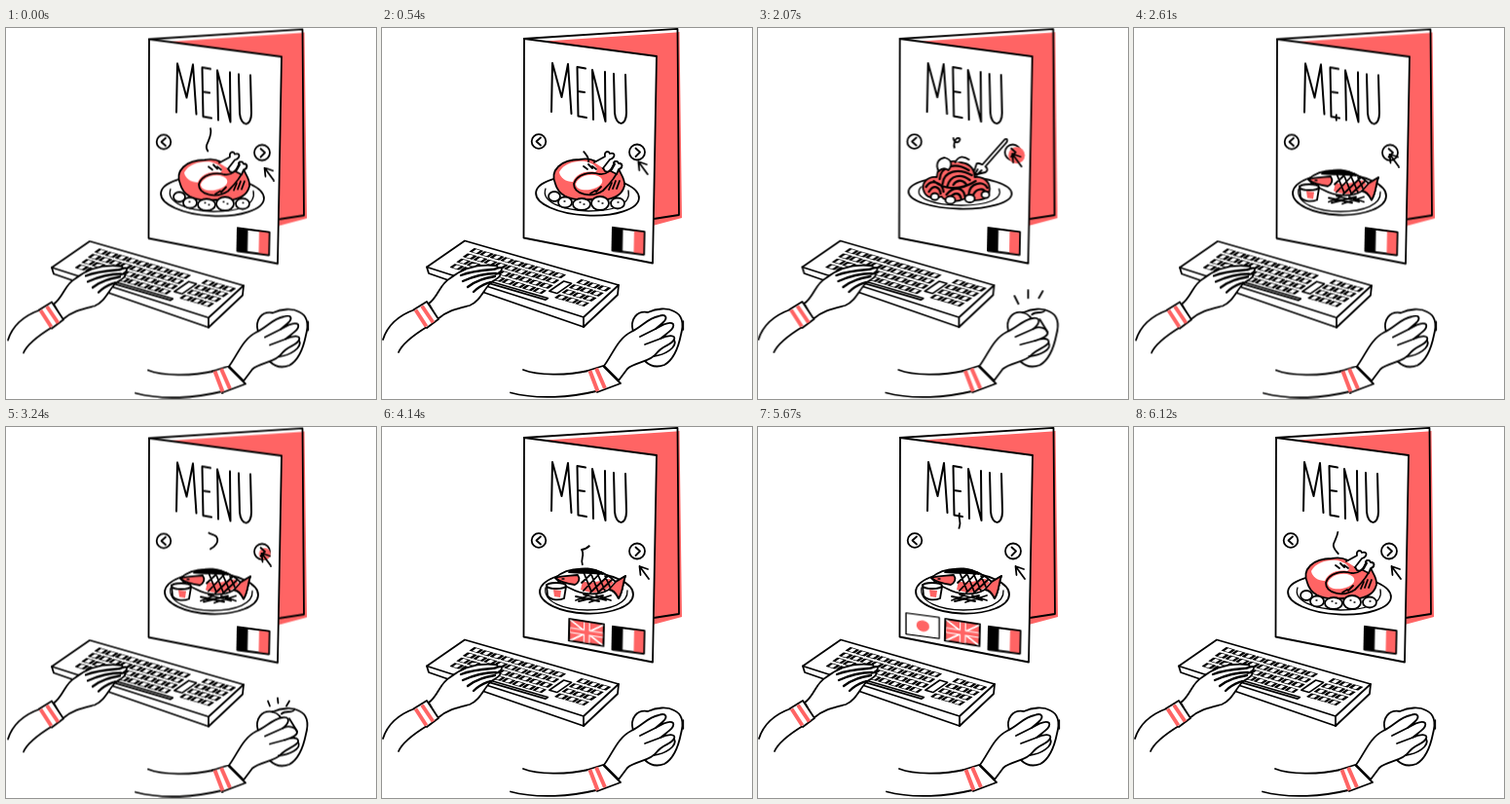
Animation of 380 by 381 pixels, one loop 6210 ms. Source, as an HTML page without scripts:

```html
<!DOCTYPE html>
<html lang="en">
<head>
<meta charset="utf-8">
<title>Menu on screen</title>
<style>
html, body { margin: 0; width: 100%; height: 100%; overflow: hidden; background: #fff; }
svg { display: block; width: 100%; height: 100%; }
.ink { fill: none; stroke: #000; stroke-width: 1.8; stroke-linecap: round; stroke-linejoin: round; }
.w { fill: #fff; }
.r { fill: #ff6464; }
.k { fill: #000; }
.n { stroke: none; }
.band { stroke: #ff6464; stroke-width: 4; stroke-linecap: butt; }
.pale { stroke: #fff; }
.thin { stroke-width: 1.3; }
.keys path { vector-effect: non-scaling-stroke; stroke-width: 1.6; }
.steam { stroke-dasharray: 26 66; stroke-linecap: butt; }

.wob { animation: wob calc(6.21s / 29) step-end infinite; }
.ray, .press, .idle, .uk, .jp, .hot { animation: 6.21s step-end infinite; }
.ray, .press, .idle, .uk, .jp { opacity: 0; }
.ray { animation-name: ray; }
.mid { animation-delay: 90ms; }
.far { animation-delay: 180ms; }
.press { animation-name: press; }
.idle { animation-name: idle; opacity: 1; }
.uk { animation-name: uk; }
.jp { animation-name: jp; }
.hot { animation-name: hot; transform-origin: 262px 128px; }
.cursor { animation: cursor 6.21s ease-in-out infinite; }
.rail { animation: rail 6.21s infinite; }

/* line boil: three redraws in turn */
@keyframes wob {
  0% { transform: translate(1px, .5px); }
  31% { transform: none; }
  66% { transform: translate(-.3px, 0) rotate(.05deg); }
}
@keyframes ray {
  0%, 15.8%, 33.2%, 53.5% { opacity: 0; }
  14.4%, 31.8%, 52.1% { opacity: 1; }
}
@keyframes press {
  0%, 18.7%, 36.1%, 56.4% { opacity: 0; }
  14.4%, 31.8%, 52.1% { opacity: 1; }
}
@keyframes idle {
  0%, 18.7%, 36.1%, 56.4% { opacity: 1; }
  14.4%, 31.8%, 52.1% { opacity: 0; }
}
/* the button flashes with each click */
@keyframes hot {
  0%, 18.7%, 36.1%, 56.4% { transform: scale(0); }
  14.4%, 17.3%, 31.8%, 34.7%, 52.1%, 55% { transform: scale(.7); }
  15.8%, 33.2%, 53.5% { transform: none; }
}
@keyframes cursor {
  0%, 6% { transform: none; }
  12%, 57.5% { transform: translate(-3px, -14px); }
  62.5%, 100% { transform: none; }
}
@keyframes rail {
  0%, 16.1% { transform: none; animation-timing-function: ease-out; }
  21.6%, 33.5% { transform: translate(-160px, 0); animation-timing-function: ease-out; }
  39% { transform: translate(-320px, 0); animation-timing-function: step-end; }
  94%, 100% { transform: none; }
}
@keyframes uk { 0%, 94% { opacity: 0; } 62.5% { opacity: 1; } }
@keyframes jp { 0%, 94% { opacity: 0; } 76% { opacity: 1; } }
</style>
</head>
<body>
<svg viewBox="0 0 380 381" role="img" aria-label="Hands at a keyboard and mouse browsing a menu">
<defs>
  <clipPath id="page"><path d="M146 11L282 29L278 241L145.500 215z"/></clipPath>
  <path id="trio" d="M0 0h4.400v12h-4.400zm6.700 0h4.400v12h-4.400zm6.700 0h4.400v12h-4.400z"/>
  <g id="row"><use href="#trio"/><use href="#trio" x="20.100"/><use href="#trio" x="40.200"/></g>
  <path id="flag" d="M0 0H32.500V23.500H0z"/>
</defs>

<g class="ink wob">
  <!-- menu card -->
  <path class="r n" d="M160 14L302 4.500L305.500 4L308 195L278 203z"/>
  <path d="M146 11L303.500 0.800L305 192L279 196"/>
  <path class="w" d="M146 11L282 29L278 241.500L145.500 215.500z"/>
  <g stroke-width="2" role="img" aria-label="MENU">
    <path d="M174 86L175 36L184.500 71L191 37L194.500 88"/>
    <path d="M209 41.500L200.500 40L201.500 90.500L210 92M201 65L208 66"/>
    <path d="M217 94L216 43L229.500 96L229 45"/>
    <path d="M238 47L239 87C240 101 251 102 251 87L250 48"/>
  </g>

  <g clip-path="url(#page)">
    <g class="rail">
      <animate attributeName="stroke-dashoffset" dur="6.21s" repeatCount="indefinite" keyTimes="0;.174;.333;.522;.667;.826;.986;1" values="-13;-145;-289;-388;-460;-540;-652;-657"/>

      <!-- roast -->
      <g>
        <ellipse class="w" cx="211" cy="172" rx="53" ry="20.500" transform="rotate(3 211 172)"/>
        <path class="thin" d="M168 165C163 179 186 187 212 188C239 188 256 181 253 167"/>
        <path class="r" d="M178 160C172 146 184 135 203 135C216 132 225 139 229 147C234 149 237 145 238 140C237 136 242 136 243 139C248 139 247 144 243 145C246 151 250 156 249 162C246 174 234 178 215 176C196 178 182 174 178 160z"/>
        <path class="w n" d="M182 148C187 139 198 136 209 137C218 139 224 145 219 148C207 146 199 151 196 158C189 158 183 154 182 148z"/>
        <path class="w" d="M218 138L229 132C228 126 233 126 234 129C240 127 240 133 234 135L227 144"/>
        <path d="M197 160C200 150 214 147 223 150C230 151 235 147 238 140M243 145C240 154 232 162 227 167C215 175 197 171 197 160"/>
        <path class="w n" d="M199 160C202 152 214 149 222 152C229 155 227 161 220 164C211 168 199 167 199 160z"/>
        <path class="w" d="M235 147L239 140C237 136 242 136 243 139C248 139 247 144 243 145L241 150z"/>
        <path d="M207 142l4 3M212 140l4 4M216 142l4 3M236 159l-3 7M240 157l-3 8M244 157l-3 8M219 167l-5 3M225 163l-5 5"/>
        <g class="w">
          <ellipse cx="177" cy="173" rx="6" ry="5"/>
          <ellipse cx="188" cy="179" rx="7" ry="5.500"/>
          <ellipse cx="205" cy="181" rx="9" ry="6"/>
          <ellipse cx="242" cy="180" rx="7" ry="5.500"/>
          <ellipse cx="224" cy="180" rx="9" ry="7"/>
        </g>
        <path class="thin" d="M203 179h1M207 181h1M222 178h1M226 180h1M187 178h1M242 179h1"/>
        <path class="steam" d="M212 138C214 130 203 127 205 120C207 114 212 108 208 100C205 95 208 90 209 85"/>
      </g>

      <!-- pasta -->
      <g transform="translate(160 0)">
        <ellipse class="w" cx="208" cy="169" rx="53" ry="16.500" transform="rotate(1 208 169)"/>
        <path class="thin" d="M168 163C158 174 181 182 209 182C237 182 252 175 248 165"/>
        <path class="w" d="M221 151L225 139C228 138 229 140 231 140L254 114C257 113 257 116 255 118L234 142C236 144 237 146 234 148zM226 145l-4 7M230 146l-5 5"/>
        <path class="r" d="M171 168C167 160 174 152 184 153C185 139 198 134 209 138C220 139 223 147 223 153C233 152 240 159 238 168C236 178 222 178 213 175C203 180 193 178 189 173C181 176 173 174 171 168z"/>
        <path stroke-width="2.300" d="M187 155C188 142 203 137 217 146M190 160C191 147 206 143 220 151M195 162C198 151 209 149 218 156M201 161C204 156 210 155 214 160M173 163C179 154 190 159 191 168M176 168C181 160 187 163 188 170M194 171C202 161 212 164 213 173M198 174C202 168 208 169 209 175M217 170C218 159 232 156 236 164M221 173C223 165 232 163 234 169M181 157C190 165 207 168 224 157"/>
        <path class="w" d="M186 147C182 139 186 134 192 133C200 135 200 141 196 146C192 143 189 144 186 147zM203 138C206 131 212 131 217 135"/>
        <g class="w">
          <ellipse cx="182" cy="173" rx="4" ry="3.500"/><ellipse cx="198" cy="176.500" rx="5" ry="4"/>
          <ellipse cx="218" cy="175" rx="5" ry="4"/><ellipse cx="234" cy="171" rx="4" ry="3.500"/>
        </g>
        <path class="steam" d="M204 136C208 128 200 124 202 118C204 110 211 113 206 117C200 119 199 108 205 102C210 97 206 92 207 88"/>
      </g>

      <!-- fish -->
      <g transform="translate(320 0)">
        <ellipse class="w" cx="210" cy="170.500" rx="48" ry="21" transform="rotate(2 210 170.500)"/>
        <path class="thin" d="M168 165C165 180 188 188 211 188C235 188 253 181 252 168"/>
        <path class="w" d="M178 155C185 148 196 145 210 146C224 147 234 153 240 159L250 153C247 160 248 168 243 176C240 170 237 167 233 167C221 174 205 172 194 166C187 163 182 160 178 155z"/>
        <path class="r" d="M178 155C184 153 192 153 201 152C204 156 202 160 198 162C190 161 183 159 178 155z"/>
        <path class="r" d="M240 159L250 153C247 160 248 168 243 176C240 170 237 167 233 167z"/>
        <path class="r n" d="M206 158C215 162 226 157 234 156L238 160L232 166C221 172 211 170 204 167z"/>
        <path class="k" d="M192 149C205 143 219 145 227 151C218 150 208 150 192 149z"/>
        <path d="M207 149l8 20M214 149l8 20M221 150l8 18M229 153l5 11M205 160l13-12M207 168l18-19M214 170l18-17M222 170l14-13"/>
        <path class="thin" d="M185 156h2"/>
        <path class="w" d="M169 162L189 164L187 176C180 179 172 177 170 173z"/>
        <ellipse class="w" cx="179" cy="163" rx="10" ry="3"/>
        <path class="r n" d="M176 167l8 1l-1 7l-6-1z"/>
        <path d="M199 174l24 5M202 179l25-6M207 172l23 6M213 180l22-7M199 178l13-5M220 173l15 5"/>
        <path class="steam" d="M206 142C203 135 209 132 205 126C212 125 219 118 215 112C211 108 204 111 207 102C209 97 205 93 207 88"/>
      </g>
    </g>
  </g>

  <!-- arrows -->
  <circle class="w" cx="161" cy="116.500" r="7.300"/>
  <path d="M163 112.500L158.500 116.500L163 120.500"/>
  <circle class="w" cx="262" cy="127.500" r="8"/>
  <circle class="r n hot" cx="266" cy="130.500" r="8.500"/>
  <path d="M260.500 123.500L265 127.500L260.500 132"/>
  <g class="cursor"><path d="M274 156L264.500 143L265.500 152M264.500 143L273 146"/></g>

  <!-- flags -->
  <g transform="matrix(1 .13 -.02 1 237 205)">
    <use href="#flag" class="w"/>
    <path class="k n" d="M0 0h10.500v23.500h-10.500z"/><path class="r n" d="M22 0h10.500v23.500h-10.500z"/>
    <use href="#flag" class="thin"/>
  </g>
  <g class="uk"><g transform="matrix(1.09 .17 -.02 .96 192.500 197)">
    <use href="#flag" class="r"/>
    <path class="pale" d="M1 1L32 23M32 1L1 23"/>
    <path class="pale" stroke-width="6" stroke-linecap="butt" d="M16.500 1V23M1 12H32"/>
    <path class="band" d="M16.500 1V23M1 12H32"/>
    <use href="#flag" class="thin"/>
  </g></g>
  <g class="jp"><g transform="matrix(1.05 .14 0 .92 152 191)">
    <use href="#flag" class="w thin"/><circle class="r n" cx="16.500" cy="12" r="6.300"/>
  </g></g>

  <!-- keyboard -->
  <path class="w" d="M46 245.500L85 218.500L243 264L242 274L207 307L48 252z"/>
  <path d="M46 245.500L207 297L243 264M207 297V307"/>
  <g class="keys" transform="matrix(1.58 .46 -.39 .27 85 218.500)">
    <use href="#row" x="10" y="13"/><use href="#row" x="10.500" y="32"/>
    <use href="#row" x="11" y="51"/><use href="#row" x="11.500" y="70"/>
    <path d="M72 31h5v38h-5zM38 89h38v6h-38z"/>
    <use href="#trio" x="79.500" y="13"/><use href="#trio" x="79.500" y="32"/>
    <use href="#trio" x="79.500" y="51"/><use href="#trio" x="79.500" y="70"/>
  </g>

  <!-- left hand -->
  <path class="w n" d="M1 320C6 304 20 294 38 287L52 305C36 314 22 322 17 333z"/>
  <path d="M1 320C6 304 20 294 34 289M17 333C21 324 33 315 46 307"/>
  <path class="w" d="M48 283C58 276 59 263 70 257C80 249 96 242 116 244C121 245 119 248 113 248L122 246C125 248 121 251 117 253L121 252C123 255 117 258 111 262C104 270 100 281 90 285C78 288 67 290 57 299z"/>
  <path d="M81 254C91 250 101 249 113 248M83 260C94 255 105 252 117 252M88 266C97 259 106 257 116 255M94 271C101 264 106 263 111 261" stroke-width="2.300"/>
  <path class="w n" d="M33 289L46 281L58 299L46 308z"/>
  <path d="M33 289L46 281L58 299L46 308"/>
  <path class="band" d="M34.500 289.500L45.500 306.500M41 285.500L52.500 302.500"/>

  <!-- right arm -->
  <path class="w n" d="M145 352C165 358 190 357 212 352L222 373C195 382 160 381 132 374z"/>
  <path d="M145 351C160 357 190 357 212 352M132 374.500C160 382 195 379 220 373"/>

  <!-- mouse -->
  <path class="w" d="M258 312C254 299 262 290 273 292C282 288 293 287 300 291C309 295 310 304 307 315C304 330 299 341 290 346C282 349 275 347 270 342"/>
  <g class="idle">
    <path class="w" d="M228 347C237 335 242 319 256 312C268 306 273 298 284 296C292 293 294 298 288 303L281 309C289 304 296 301 299 304C301 309 293 313 286 319C294 315 302 315 300 320C297 326 288 326 282 334C276 343 260 343 252 350L243 362z"/>
    <path d="M281 309L265 317M286 319L270 325M300 320C304 328 290 336 279 337"/>
    <path class="thin" d="M309.500 301v9"/>
  </g>
  <g class="press">
    <path d="M273 292C279 294 282 297 282 302M282 294C286 290 292 294 295 290"/>
    <path class="w" d="M228 347C237 335 242 319 256 312C266 308 272 300 282 298C291 296 291 303 283 309C289 305 297 308 298 313C298 317 291 319 285 321C293 318 300 318 299 323C296 328 288 329 282 335C276 343 260 343 252 350L243 362z"/>
    <path d="M283 309L265 317M285 321L270 325M290 299L298 312M299 323C303 330 290 336 279 337"/>
  </g>
  <path class="w n" d="M211 352L227 347L245 365L221 374z"/>
  <path d="M211 352L227 347L245 365L221 374"/>
  <path class="band" d="M213.500 352L221.500 373M220 349.500L229 370"/>

  <!-- click marks -->
  <path class="ray" d="M270 286L268 281M278.500 283L278 278M287 286L290 281"/>
  <path class="ray mid" d="M268 283L264 275M278 277V269M289 277L293 270"/>
  <path class="ray far" d="M265 274L263 272M278 269V267M293 271L294 269"/>
</g>
</svg>
</body>
</html>
```
